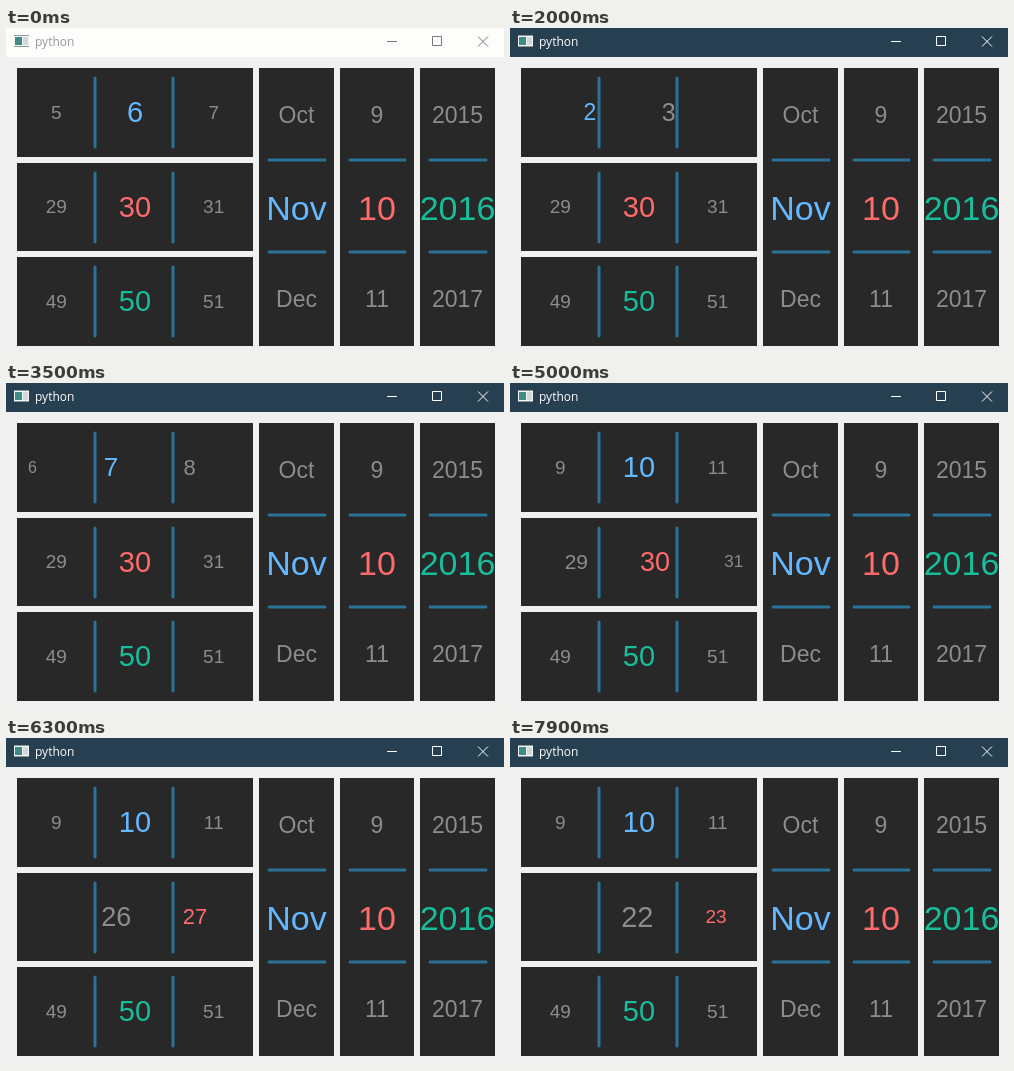
An HTML page for the animation above (8000 ms loop, 498 by 327 pixels).

```html
<!DOCTYPE html>
<html lang="en">
<head>
<meta charset="utf-8">
<title>python</title>
<style>
  html, body { margin: 0; width: 100%; height: 100%; overflow: hidden; background: #f0f0f0; }
  svg { display: block; width: 498px; height: 327px; }
  text { font-family: "Liberation Sans", Arial, sans-serif; text-anchor: middle; }
  #title { font: 12px "Open Sans", "Noto Sans", sans-serif; text-anchor: start; }
</style>
</head>
<body>
<svg id="stage" viewBox="0 0 498 327">
  <rect width="498" height="327" fill="#f0f0f0"/>
  <rect id="bar" width="498" height="29"/>
  <g id="icon" shape-rendering="crispEdges">
    <rect x="8" y="7" width="15" height="12" fill="#f4f6f6"/>
    <path d="M8 7h15v1h-15zM8 18h15v1h-15z" fill="#8a979c"/>
    <rect x="9" y="9" width="7" height="8" fill="#428a86"/>
    <rect x="17" y="9" width="5" height="8" fill="#d3dadb"/>
  </g>
  <text id="title" x="29" y="18">python</text>
  <path id="buttons" d="M381 13.5h10M426.5 8.5h9v9h-9zM472 8.5l10 10M482 8.5l-10 10" fill="none"/>
</svg>
<script>
const NS = 'http://www.w3.org/2000/svg';
const stage = document.getElementById('stage');
const bar = document.getElementById('bar');
const title = document.getElementById('title');
const buttons = document.getElementById('buttons');

const LOOP = 8000, STEP = 100;
const GREY = '#8c8c8c', BLUE = '#64b8ff', RED = '#ff6b6b', GREEN = '#18bd9b';
const ROW_W = 236, SPACE = ROW_W / 3;

function add(parent, tag, attrs) {
  const el = parent.appendChild(document.createElementNS(NS, tag));
  for (const k in attrs) el.setAttribute(k, attrs[k]);
  return el;
}

// A dark panel that clips whatever is drawn in it, with its two divider lines.
function panel(x, y, width, height, lines) {
  const box = add(stage, 'svg', { x, y, width, height });
  add(box, 'rect', { width, height, fill: '#282828' });
  add(box, 'path', { d: lines, stroke: '#2a7297', 'stroke-width': 3, 'stroke-linecap': 'round' });
  return box;
}

function label(box, str, x, y, size, fill) {
  const el = add(box, 'text', { x, y, 'font-size': size, fill });
  el.textContent = str;
  return el;
}

function row(y, height, color) {
  const box = panel(11, y, ROW_W, height, 'M78 10V79M156 10V79');
  const items = [-1, 0, 1].map(i => label(box, '', 0, 0, 19, i ? GREY : color));
  return (value, offset) => items.forEach((el, i) => {
    const shift = offset + (i - 1) * SPACE;
    const size = Math.floor((ROW_W - Math.abs(shift)) / 8);
    const asc = Math.round(size * 0.905), desc = Math.round(size * 0.212);
    el.textContent = value + i - 1;
    el.setAttribute('x', ROW_W / 2 + shift);
    el.setAttribute('y', Math.floor((height - asc - desc) / 2) + asc);
    el.setAttribute('font-size', size);
  });
}

function column(x, width, color, [prev, current, next]) {
  const end = width - 9;
  const box = panel(x, 40, width, 278, `M10 92H${end}M10 184H${end}`);
  const mid = width / 2;
  label(box, prev, mid, 55, 23, GREY);
  label(box, current, mid, 152, 34, color);
  label(box, next, mid, 239, 23, GREY);
}

const first = row(40, 89, BLUE);
const second = row(135, 88, RED);
row(229, 89, GREEN)(50, 0);
column(253, 75, BLUE, ['Oct', 'Nov', 'Dec']);
column(334, 74, RED, [9, 10, 11]);
column(414, 75, GREEN, [2015, 2016, 2017]);

// Drag positions as [time, value].
const firstDrag = [[1100, 6], [1200, 5], [1300, 3], [1400, 2], [1800, 2], [2600, 4.48],
  [2800, 5.2], [3100, 6.2], [3300, 6.85], [3400, 7.16], [3500, 7.31],
  [3600, 7.7], [3900, 9], [4100, 9.8], [4200, 10]];
const secondDrag = [[4900, 30], [5100, 29.6], [5700, 27.94], [7000, 24.26], [7600, 22.63], [7900, 22.02]];

function at(keys, t) {
  if (t <= keys[0][0]) return keys[0][1];
  for (let i = 1; i < keys.length; i++) {
    const [t0, v0] = keys[i - 1], [t1, v1] = keys[i];
    if (t <= t1) return v0 + (v1 - v0) * (t - t0) / (t1 - t0);
  }
  return keys[keys.length - 1][1];
}

// The picked number only changes once it has been dragged a full space.
function drag(draw, keys, t, pick) {
  const pos = at(keys, t), value = pick(pos);
  draw(value, Math.round((value - pos) * SPACE));
}

function render(ms) {
  const t = Math.floor(ms % LOOP / STEP) * STEP;
  const active = t >= 1100;
  bar.setAttribute('fill', active ? '#263f51' : '#fdfdfb');
  title.setAttribute('fill', active ? '#ffffff' : '#999999');
  buttons.setAttribute('stroke', active ? '#ffffff' : '#777777');
  drag(first, firstDrag, t, Math.floor);
  drag(second, secondDrag, t, Math.ceil);
}

const start = performance.now();
function tick() {
  render(performance.now() - start);
  requestAnimationFrame(tick);
}
tick();
</script>
</body>
</html>
```
